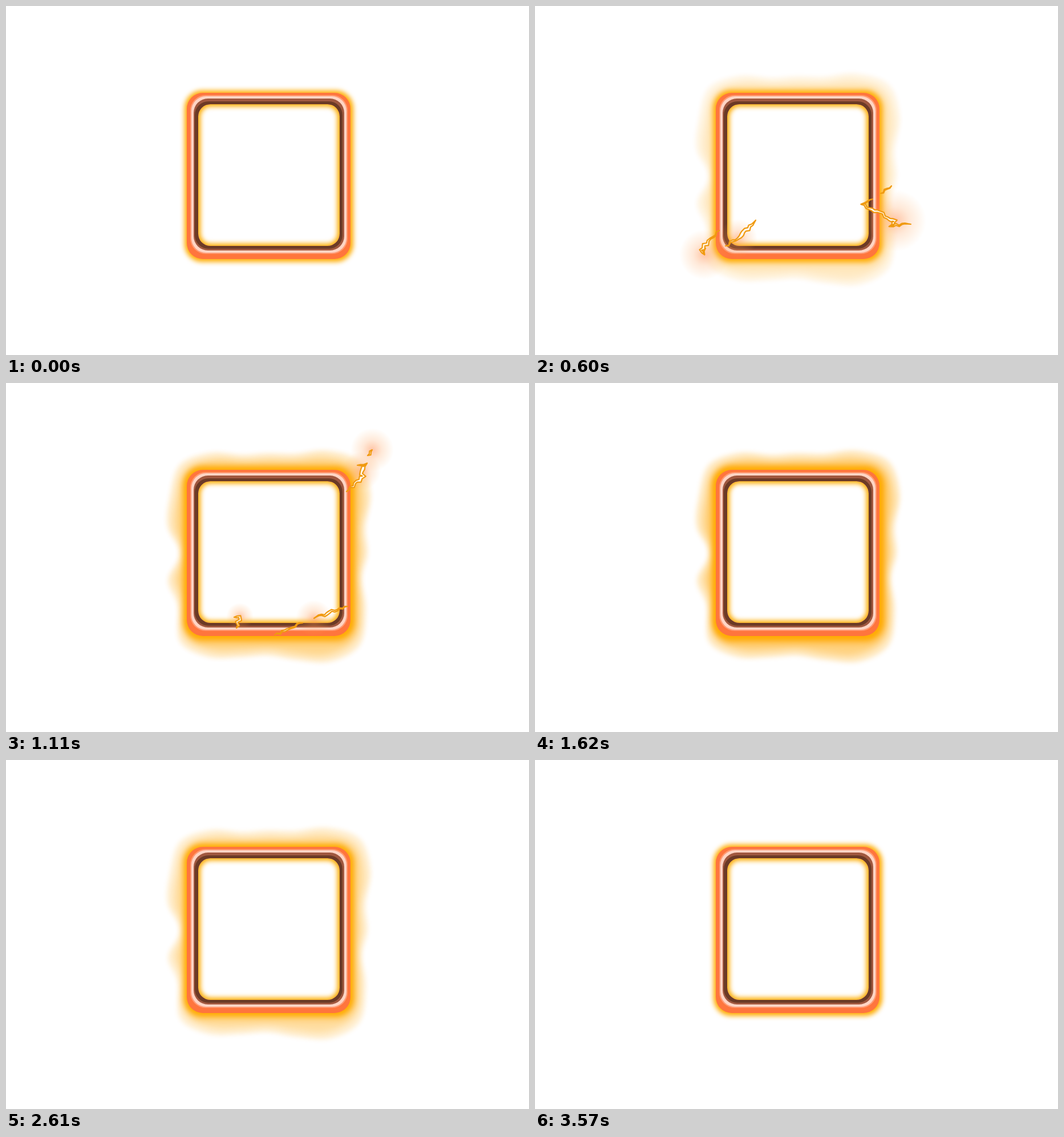
Recreate the animation shown at these times as an HTML page. Size 917 by 611 pixels, loop 3600 ms.

```html
<!DOCTYPE html>
<html lang="en">
<head>
<meta charset="utf-8">
<title>Electric frame</title>
<style>
  html, body { margin: 0; width: 100%; height: 100%; overflow: hidden; background: #fff; }
  svg { display: block; width: 100vw; height: 100vh; }
</style>
</head>
<body>
<svg viewBox="0 0 917 611">
  <defs>
    <filter id="soft" x="-20%" y="-20%" width="140%" height="140%"><feGaussianBlur stdDeviation="4"/></filter>
    <filter id="wide" x="-20%" y="-20%" width="140%" height="140%"><feGaussianBlur stdDeviation="7"/></filter>
    <radialGradient id="halo">
      <stop offset="0" stop-color="#ff8a50" stop-opacity=".5"/>
      <stop offset=".45" stop-color="#ff9a50" stop-opacity=".22"/>
      <stop offset="1" stop-color="#ffa850" stop-opacity="0"/>
    </radialGradient>
  </defs>
  <g id="aura" fill="#ffa500"></g>
  <g id="frame" fill-rule="evenodd"></g>
  <g id="sparks" stroke="#f09a10" stroke-width="2.2" stroke-linejoin="round"></g>
</svg>
<script>
const LOOP = 3600, STEP = 30;
const $ = id => document.getElementById(id);
const aura = $('aura'), frame = $('frame'), sparks = $('sparks');

function add(parent, tag, attrs) {
  const el = document.createElementNS('http://www.w3.org/2000/svg', tag);
  for (const k in attrs) el.setAttribute(k, attrs[k]);
  return parent.appendChild(el);
}

function roundRect(x0, y0, x1, y1, r) {
  const arc = (x, y) => `A${r} ${r} 0 0 1 ${x} ${y}`;
  return `M${x0 + r} ${y0}H${x1 - r}${arc(x1, y0 + r)}V${y1 - r}${arc(x1 - r, y1)}` +
    `H${x0 + r}${arc(x0, y1 - r)}V${y0 + r}${arc(x0 + r, y0)}Z`;
}

// Closed Catmull-Rom curve
function blob(p) {
  const n = p.length, at = i => p[(i + n) % n];
  let d = `M${p[0]}`;
  for (let i = 0; i < n; i++) {
    const [a, b, c, e] = [at(i - 1), at(i), at(i + 1), at(i + 2)];
    d += `C${b.map((v, k) => v + (c[k] - a[k]) / 6)} ${c.map((v, k) => v - (e[k] - b[k]) / 6)} ${c}`;
  }
  return d + 'Z';
}

// Reach of the aura beyond the frame, clockwise from the right
const reach = [29, 19, 26, 30, 45, 42, 34, 37, 37, 24, 14, 31,
  10, 32, 28, 24, 31, 27, 30, 29, 35, 30, 35, 25];
const edge = blob(reach.map((d, i) => {
  const a = i / reach.length * 2 * Math.PI, c = Math.cos(a), s = Math.sin(a);
  const r = (145 + d) / (c ** 8 + s ** 8) ** (1 / 8);
  return [460 + r * c, 298 + r * s];
}));
add(aura, 'path', { d: edge, opacity: .22, filter: 'url(#soft)' });
add(aura, 'path', {
  d: edge, opacity: .36, filter: 'url(#wide)',
  transform: 'translate(462 302) scale(.94) translate(-461 -302)'
});
add(aura, 'path', { d: roundRect(311, 145, 613, 453, 34), opacity: .85, filter: 'url(#wide)' });

const hole = roundRect(337, 172, 585, 420, 21);
const ring = (x0, y0, x1, y1, r, fill) =>
  add(frame, 'path', { d: roundRect(x0, y0, x1, y1, r) + hole, fill });
add(frame, 'path', { d: roundRect(318, 153, 603, 442, 28), fill: '#fff' });
add(frame, 'path', {
  d: roundRect(313, 148, 609, 448, 31) + roundRect(341, 176, 581, 416, 18),
  fill: '#ffac00', filter: 'url(#soft)'
});
ring(317, 152, 604, 443, 28, '#ff753d');
ring(323, 156, 599, 434, 27, '#ff9b74');
ring(325, 158, 597, 432, 26, '#ffd5c5');
ring(329, 162, 593, 428, 25, '#a0583f');
ring(331, 167, 590, 425, 24, '#6b3a26');

function rand(seed) {
  const v = Math.sin(seed * 127.1 + 11.7) * 43758.5453;
  return v - Math.floor(v);
}

// Corner points joined by short, jagged steps
function crackle(pts, seed) {
  const out = [pts[0]];
  for (let i = 1; i < pts.length; i++) {
    const [ax, ay] = pts[i - 1], dx = pts[i][0] - ax, dy = pts[i][1] - ay;
    const len = Math.hypot(dx, dy), n = Math.max(2, Math.round(len / 5));
    for (let j = 1; j <= n; j++) {
      const f = j / n, off = j < n ? (rand(seed + i * 17 + j) - .5) * 5 / len : 0;
      out.push([ax + dx * f - dy * off, ay + dy * f + dx * off]);
    }
  }
  return out;
}

// Tapered ribbon with ragged edges; the wide middle leaves a white core
function ribbon(pts, width, seed) {
  const n = pts.length - 1, left = [], right = [];
  pts.forEach(([x, y], j) => {
    const a = pts[Math.max(0, j - 1)], b = pts[Math.min(n, j + 1)];
    const dx = b[0] - a[0], dy = b[1] - a[1], len = Math.hypot(dx, dy) || 1;
    const h = width / 2 * Math.sin(Math.PI * j / n);
    const side = s => {
      const w = s * h * (.5 + rand(seed + j * 2 + s)) / len;
      return [(x - dy * w).toFixed(1), (y + dx * w).toFixed(1)];
    };
    left.push(side(1));
    right.unshift(side(-1));
  });
  return 'M' + left.concat(right).join('L') + 'Z';
}

const groups = [];
// Each bolt: width, halo radius, then corner points
function flash(start, end, ...bolts) {
  const g = add(sparks, 'g', {});
  const parts = bolts.map(([width, r, ...c], i) => {
    const pts = [];
    for (let j = 0; j < c.length; j += 2) pts.push([c[j], c[j + 1]]);
    const [cx, cy] = pts[pts.length >> 1];
    if (r) add(g, 'circle', { cx, cy, r, fill: 'url(#halo)', stroke: 'none' });
    return { width, pts: crackle(pts, start + i * 71) };
  });
  parts.forEach(p => p.el = add(g, 'path', { fill: '#fffaf0' }));
  groups.push({ start, end, g, parts });
}

flash(90, 330,
  [4, 38, 440, 176, 512, 118],
  [3, 30, 322, 286, 335, 240]);
flash(390, 780,
  [2.5, 0, 625, 315, 606, 328],
  [5, 54, 592, 338, 573, 347, 632, 376, 623, 385, 659, 382],
  [5.5, 34, 387, 375, 356, 407, 334, 420],
  [4, 44, 323, 393, 290, 427, 297, 435, 299, 424]);
flash(810, 930,
  [4, 30, 420, 446, 489, 473]);
flash(960, 1380,
  [3, 38, 634, 127, 642, 117],
  [6, 34, 616, 144, 632, 142, 623, 154, 627, 163, 597, 190],
  [5, 24, 400, 410, 410, 409, 404, 429],
  [3.5, 32, 599, 391, 540, 412],
  [3, 0, 520, 420, 471, 441]);

const clamp = v => Math.max(0, Math.min(1, v));

function draw(ms) {
  const t = Math.floor((ms % LOOP) / STEP) * STEP;
  aura.setAttribute('opacity', Math.min(clamp(t / 1230), clamp((3570 - t) / 1290)));
  groups.forEach(({ start, end, g, parts }) => {
    const on = t >= start && t < end;
    g.setAttribute('display', on ? 'inline' : 'none');
    if (!on) return;
    const power = Math.min(clamp((t - start + STEP) / 90), clamp((end - t) / 150));
    const seed = start + Math.floor(t / 60) * 7;
    g.setAttribute('opacity', power);
    parts.forEach((p, i) =>
      p.el.setAttribute('d', ribbon(p.pts, p.width * (.4 + .6 * power), seed + i * 53)));
  });
}

const began = performance.now();
function tick() {
  draw(performance.now() - began);
  requestAnimationFrame(tick);
}
tick();
</script>
</body>
</html>
```
